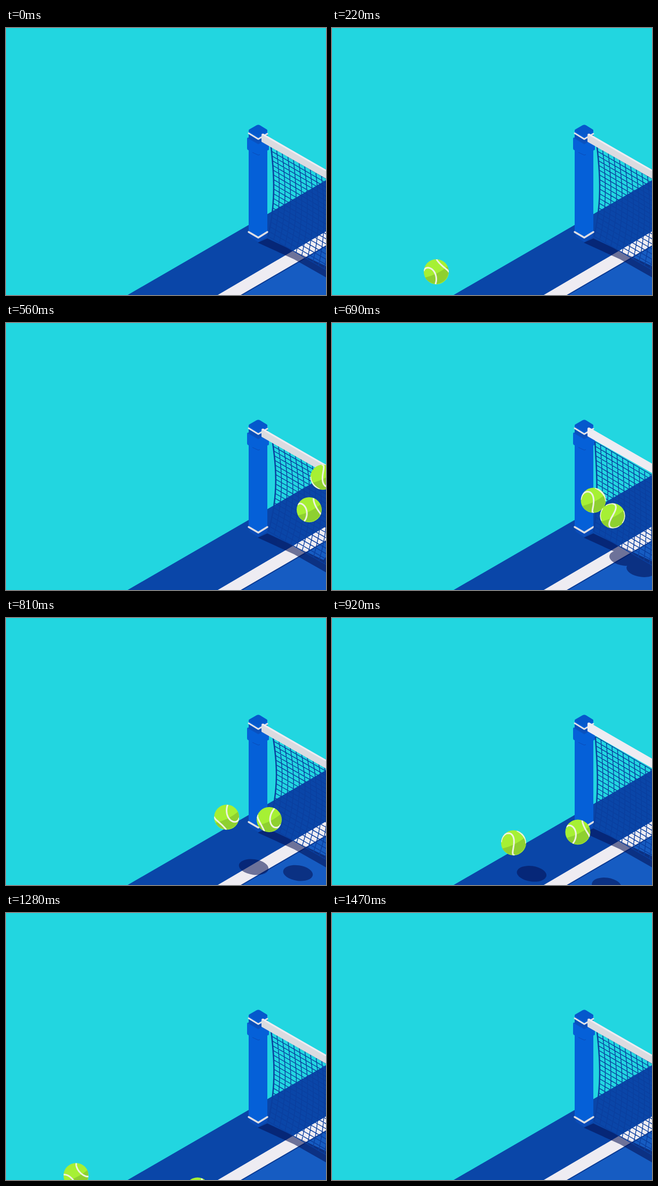
These frames come from a looping animation (600x500 px, 3000 ms). An HTML page:

```html
<!DOCTYPE html>
<html lang="en">
<head>
<meta charset="utf-8">
<title>Tennis balls at the net</title>
<style>
html, body { margin: 0; width: 100%; height: 100%; overflow: hidden; background: #22d6e0; }
svg { display: block; width: 100vw; height: 100vh; }
</style>
</head>
<body>
<svg viewBox="0 0 600 500">
  <defs>
    <clipPath id="courtClip"><path d="M228 500L600 285V500Z"/></clipPath>
    <clipPath id="ballClip"><circle r="23.5"/></clipPath>
  </defs>
  <rect width="600" height="500" fill="#22d6e0"/>
  <path d="M228 500L600 285V500Z" fill="#0a46a8"/>
  <path d="M440 500L600 407V500Z" fill="#165cc2"/>
  <path d="M440 501L601 407.500" stroke="#0a3890" stroke-width="2"/>
  <path d="M397 500L600 381V407L440 500Z" fill="#eeecf2"/>
  <g clip-path="url(#courtClip)" fill="#051050" opacity=".55">
    <path d="M472 402L490 394L600 446V467L540 433Z"/>
    <ellipse class="shade" rx="28" ry="14.500"/>
    <ellipse class="shade" rx="28" ry="14.500"/>
  </g>
  <g stroke-linejoin="round">
    <path d="M457 384V391L473 401L489 391V384Z" fill="#0a4cb8"/>
    <path d="M455 200H490V382L473 392L455 382Z" fill="#0560d8"/>
    <path d="M455 382L473 392.500L490 382" fill="none" stroke="#dedee4" stroke-width="3.500" stroke-linecap="round"/>
    <path d="M455 197V206L473 217L490 207V197Z" fill="#0a50bc"/>
    <path d="M454 205L473 216L492 206Q493 206 493 208V228L473 238L453 228Q452 227 452 225V207Q452 205 454 205Z" fill="#0560d8"/>
    <path d="M454 206L473 217L491 207M462 233L473 238L476 237" fill="none" stroke="#0a4cb8"/>
    <path d="M455 191V197L473 208L490 198V191Z" fill="#0560d8"/>
    <path d="M456 190L470 182Q473 180.500 476 182L489 190Q491 192 489 194L476 202Q473 204 470 202L457 194Q454 192 456 190Z" fill="#0558cc"/>
    <path d="M455 197L473 208L490 198" fill="none" stroke="#e2e2e8" stroke-width="3" stroke-linecap="round"/>
  </g>
  <g fill="none" stroke="#0a3f9f">
    <path id="mesh" stroke-width="1.400"/>
    <path id="meshEdge" stroke-width="2.500"/>
  </g>
  <path id="tape"/>
  <path id="tapeTop" fill="none" stroke="#eeecf2" stroke-width="3"/>
  <g id="balls"></g>
</svg>
<script>
const LOOP = 3000, END = 1470, HIT = 540, KNOWN = 690, BOUNCE = 1010, RADIUS = 23.5;
const BEATS = [60, 390, KNOWN, 920, 1060, 1280, END];
const $ = id => document.getElementById(id);
const shades = document.querySelectorAll('.shade');

// inbound: place at 390 ms; rebound: place, speed and acceleration at KNOWN
const balls = [
  {
    inbound: [413, 365],
    x: [490, -.677, .000117],
    y: [332, .327, .00026],
    bounces: true,
    height: d => 16 + (d < 0 ? -.537 : .27) * d - .00078 * d * d,
    turn: 220, phase: Math.PI / 2, tilt: .05
  },
  {
    inbound: [390, 439],
    x: [526, -.283, 0],
    y: [361, .114, .00026],
    bounces: false,
    height: () => 100,
    turn: 370, phase: 0, tilt: .4
  }
];

function makeBall(ball) {
  ball.node = document.createElementNS('http://www.w3.org/2000/svg', 'g');
  ball.node.innerHTML = `<circle r="${RADIUS}" fill="#a6f034"/>
    <path d="M-20.900 10.700Q3 5 21.200 -10A23.500 23.500 0 0 1 -20.900 10.700Z" fill="#8ed030"/>
    <path class="seam" clip-path="url(#ballClip)" fill="none" stroke="#eef2e2" stroke-width="3"/>`;
  ball.seam = ball.node.querySelector('.seam');
  $('balls').append(ball.node);
}

// the motion runs on short held steps
function hold(t) {
  if (t < BEATS[0]) return 0;
  const i = BEATS.findIndex(b => b > t);
  if (i < 0) return END;
  const from = BEATS[i - 1], span = BEATS[i] - from;
  const steps = Math.round(span / 30);
  return from + Math.floor((t - from) / span * steps) * span / steps;
}

const glide = ([p, v, a], s) => p + v * s + a * s * s;

function rebound(ball, t) {
  const x = glide(ball.x, t - KNOWN);
  if (!ball.bounces || t < BOUNCE) return [x, glide(ball.y, t - KNOWN)];
  const floor = glide(ball.y, BOUNCE - KNOWN);
  return [x, glide([floor, .035, ball.y[2]], t - BOUNCE)];
}

function place(ball, t) {
  if (t >= HIT) return rebound(ball, t);
  const hit = rebound(ball, HIT);
  const k = (t - 390) / (HIT - 390);
  return ball.inbound.map((p, i) => p + (hit[i] - p) * k);
}

function height(ball, t) {
  return ball.height(Math.max(t, HIT) - BOUNCE) + .4 * Math.max(0, HIT - t);
}

// visible half of a rolling seam curve
function seamPath(spin, tilt) {
  const c = Math.cos(spin), s = Math.sin(spin);
  const ct = RADIUS * Math.cos(tilt), st = RADIUS * Math.sin(tilt);
  let d = '', drawing = false;
  for (let i = 0; i <= 96; i++) {
    const a = i / 48 * Math.PI;
    const depth = .7 * Math.cos(a) + .3 * Math.cos(3 * a);
    const x = .7 * Math.sin(a) - .3 * Math.sin(3 * a);
    const up = .917 * Math.sin(2 * a);
    const y = up * c - depth * s;
    const front = up * s + depth * c > -.03;
    if (front) d += `${drawing ? 'L' : 'M'}${(x * ct - y * st).toFixed(2)} ${(x * st + y * ct).toFixed(2)}`;
    drawing = front;
  }
  return d;
}

function drawBall(ball, i, t) {
  const [x, y] = place(ball, t);
  const h = height(ball, t);
  ball.node.setAttribute('transform', `translate(${x} ${y})`);
  shades[i].setAttribute('transform', `translate(${x + 6 + .48 * h} ${y + h}) rotate(8)`);
  ball.seam.setAttribute('d', seamPath(ball.phase + Math.PI * (t - 1060) / ball.turn, ball.tilt));
}

// fading swing after the hit
function sway(t) {
  const s = t - 510, p = s / 800;
  return p <= 0 || p >= 1 ? 0 : 7 * (1 - p ** 3) * Math.sin(2 * Math.PI * s / 244);
}

function netPoint(u, v, push) {
  const bulge = push * Math.sin(Math.PI * (.25 + .7 * v)) * (.8 + u / 300);
  const x = 497 + u + 5 * Math.sin(Math.PI * v * 1.1) - 4 * v ** 6 + bulge;
  return `${x.toFixed(2)} ${(222 + .58 * u + 168 * v).toFixed(2)}`;
}

function strand(u, push) {
  const points = [];
  for (let i = 0; i <= 14; i++) points.push(netPoint(u, i / 14, push));
  return 'M' + points.join('L');
}

function drawNet(t) {
  const push = sway(t);
  let d = '';
  for (let u = 10.5; u < 130; u += 10.5) d += strand(u, push);
  for (let i = 0; i <= 19; i++) d += `M${netPoint(0, i / 19, push)}L${netPoint(135, i / 19, push)}`;
  $('mesh').setAttribute('d', d);
  $('meshEdge').setAttribute('d', strand(0, push));

  const lean = Math.max(0, Math.min(1, -push / 3));
  const top = 198 - 2 * lean, base = 213 - lean;
  const mix = (a, b) => Math.round(a + (b - a) * lean);
  $('tape').setAttribute('d', `M479 ${top + 2}Q479 ${top - 1} 483 ${top}L600 ${top + 68}V${base + 69}L479 ${base}Z`);
  $('tape').setAttribute('fill', `rgb(${mix(218, 238)},${mix(219, 236)},${mix(224, 242)})`);
  $('tapeTop').setAttribute('d', `M481 ${top + 1}L600 ${top + 69}`);
}

function render(time) {
  const t = hold(time % LOOP);
  drawNet(t);
  balls.forEach((ball, i) => drawBall(ball, i, t));
}

balls.forEach(makeBall);
const start = performance.now();
function tick() {
  render(performance.now() - start);
  requestAnimationFrame(tick);
}
tick();
</script>
</body>
</html>
```
